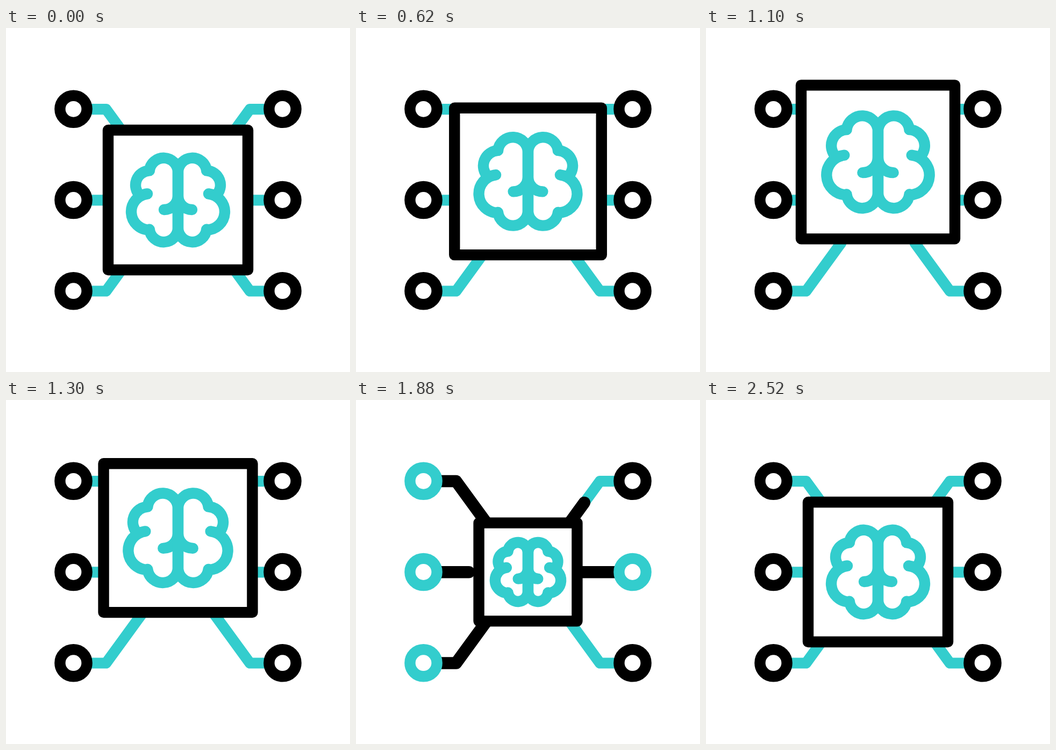
An HTML page for the animation above (3 s loop, 640 by 640 pixels).

```html
<!DOCTYPE html>
<html lang="en">
<head>
<meta charset="utf-8">
<title>Brain chip</title>
<style>
  html, body { margin: 0; width: 100%; height: 100%; overflow: hidden; background: #fff; }
  svg { display: block; width: 100%; height: 100%; }
  path, circle { fill: none; stroke-linecap: round; stroke-linejoin: round; }
</style>
</head>
<body>
<svg viewBox="0 0 640 640">
  <g id="wires" transform="translate(0 .3)"></g>
  <g id="chip">
    <path d="M190 190H450V450H190Z" stroke="#000" style="fill:#fff"/>
    <g id="brain" stroke="#33cdcd"></g>
  </g>
  <g id="nodes"></g>
</svg>
<script>
const LOOP = 3000, RUN = 146, TEAL = '#33cdcd', BLACK = '#000';
const $ = id => document.getElementById(id);

function add(parent, tag, attrs) {
  const el = document.createElementNS('http://www.w3.org/2000/svg', tag);
  for (const k in attrs) el.setAttribute(k, attrs[k]);
  return parent.appendChild(el);
}

// One half of the brain; the other is its mirror image.
const half = `M320 268A26.7 26.7 0 0 0 266.8 265.3
  M267 265.3A27 27 0 0 0 249.3 311.7
  M263 308.5A33.6 33.6 0 0 0 267 375.5
  M266.8 374.7A26.7 26.7 0 0 0 320 372V268
  M294 338A26 26 0 0 0 320 312`;
add($('brain'), 'path', { d: half });
add($('brain'), 'path', { d: half, transform: 'matrix(-1 0 0 1 640 0)' });

// Nodes as [side, row], in the order the pulses reach them.
const order = [[-1, -1], [-1, 0], [-1, 1], [1, 0], [1, -1], [1, 1]];
const links = order.map(([side, row], i) => {
  const x = dx => 320 + side * dx, y = 320 + row * 169.2;
  const d = row
    ? `M${x(68.8)} ${320 + row * 80}L${x(133.8)} ${y}H${x(180)}`
    : `M${315 + side * 105} ${y}H${x(180)}`;
  add($('wires'), 'path', { d, stroke: TEAL, 'stroke-width': 20.2 });
  const pulse = add($('wires'), 'path', { d, stroke: BLACK, 'stroke-width': 22.5 });
  const ring = add($('nodes'), 'circle',
    { cx: x(194.5), cy: y, r: 25.1, 'stroke-width': 20.4, style: 'fill:#fff' });
  return { pulse, ring, length: pulse.getTotalLength(),
    head: 1460 + 91 * i, tail: i < 4 ? 2000 : 2200 };
});

const progress = (t, from, to) => Math.min(1, Math.max(0, (t - from) / (to - from)));

// Ease in and out, a little slower at the start.
function ease(t, from, to) {
  const u = progress(t, from, to) ** 1.17;
  return u * u * (3 - 2 * u);
}

function draw(t) {
  const lift = 71 * (ease(t, 0, 1140) - ease(t, 1178, 1655));
  const scale = 1 + .1 * ease(t, 0, 1100) - .4 * ease(t, 1193, 1655) + .3 * ease(t, 1835, 2335);
  $('chip').setAttribute('transform',
    `translate(320 ${320 - lift}) scale(${scale}) translate(-320 -320)`);
  $('chip').setAttribute('stroke-width', 20.4 / scale);

  for (const { pulse, ring, length, head, tail } of links) {
    const a = progress(t, tail, tail + RUN), b = progress(t, head, head + RUN);
    pulse.style.display = b > a ? '' : 'none';
    pulse.style.strokeDasharray = `${(b - a) * length + .01} 999`;
    pulse.style.strokeDashoffset = -a * length;
    ring.setAttribute('stroke', b === 1 && a < 1 ? TEAL : BLACK);
  }
}

const start = performance.now();
function tick() {
  draw((performance.now() - start) % LOOP);
  requestAnimationFrame(tick);
}
tick();
</script>
</body>
</html>
```
